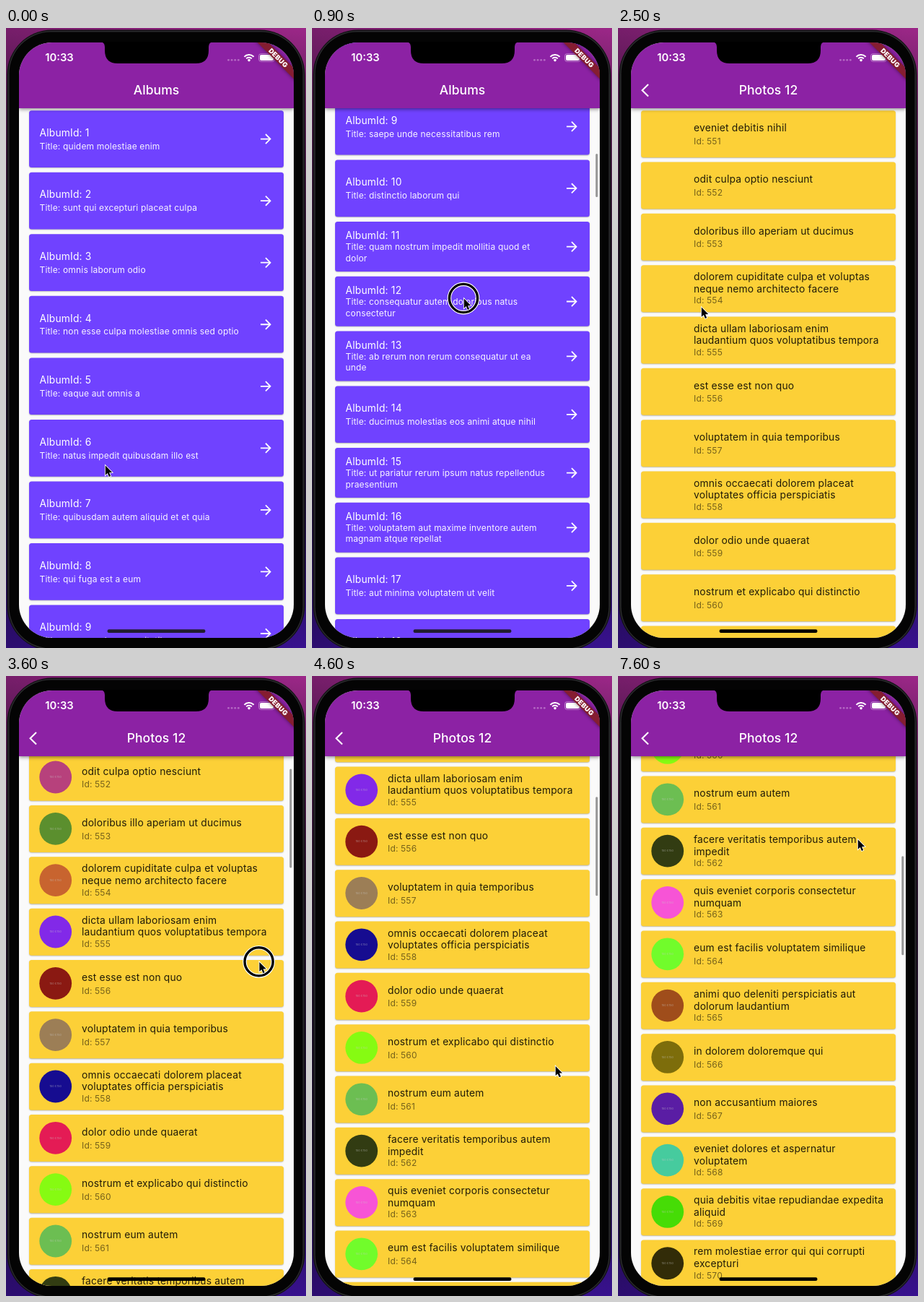
Animation, 416 px wide and 858 px high, one loop 7.7 s. Source, as an HTML page with a canvas:

```html
<!DOCTYPE html>
<html lang="en">
<head>
<meta charset="utf-8">
<title>Albums</title>
<style>
  html, body { margin: 0; width: 100%; height: 100%; overflow: hidden; background: #000; }
  canvas { display: block; width: 416px; height: 858px; }
</style>
</head>
<body>
<canvas id="stage"></canvas>
<script>
const W = 416, H = 858, LOOP = 7700, STEP = 100;
const SCREEN = { x: 18, y: 20, w: 381, h: 824, r: 46 };
const BAR_BOTTOM = 111;
const FONT = 'Inter, "Liberation Sans", sans-serif';

const canvas = document.getElementById('stage');
const dpr = window.devicePixelRatio || 1;
canvas.width = W * dpr;
canvas.height = H * dpr;
const ctx = canvas.getContext('2d');

// A bar marks a line break.
const albums = [
  'quidem molestiae enim', 'sunt qui excepturi placeat culpa', 'omnis laborum odio',
  'non esse culpa molestiae omnis sed optio', 'eaque aut omnis a',
  'natus impedit quibusdam illo est', 'quibusdam autem aliquid et et quia',
  'qui fuga est a eum', 'saepe unde necessitatibus rem', 'distinctio laborum qui',
  'quam nostrum impedit mollitia quod et|dolor',
  'consequatur autem doloribus natus|consectetur',
  'ab rerum non rerum consequatur ut ea|unde', 'ducimus molestias eos animi atque nihil',
  'ut pariatur rerum ipsum natus repellendus|praesentium',
  'voluptatem aut maxime inventore autem|magnam atque repellat',
  'aut minima voluptatem ut velit', 'nesciunt quia et doloremque'
].map(s => s.split('|'));

const photos = [
  ['eveniet debitis nihil', '#3f9ad0'],
  ['odit culpa optio nesciunt', '#b7417c'],
  ['doloribus illo aperiam ut ducimus', '#5b8f2e'],
  ['dolorem cupiditate culpa et voluptas|neque nemo architecto facere', '#c8642f'],
  ['dicta ullam laboriosam enim|laudantium quos voluptatibus tempora', '#8229e8'],
  ['est esse est non quo', '#8a1912'],
  ['voluptatem in quia temporibus', '#9c7e56'],
  ['omnis occaecati dolorem placeat|voluptates officia perspiciatis', '#160c90'],
  ['dolor odio unde quaerat', '#e41b55'],
  ['nostrum et explicabo qui distinctio', '#86fb12'],
  ['nostrum eum autem', '#6cbe52'],
  ['facere veritatis temporibus autem|impedit', '#323c12'],
  ['quis eveniet corporis consectetur|numquam', '#f754d6'],
  ['eum est facilis voluptatem similique', '#71fc2b'],
  ['animi quo deleniti perspiciatis aut|dolorum laudantium', '#9f4d1b'],
  ['in dolorem doloremque qui', '#7d6d0b'],
  ['non accusantium maiores', '#5a1da4'],
  ['eveniet dolores et aspernatur|voluptatem', '#46cb9e'],
  ['quia debitis vitae repudiandae expedita|aliquid', '#46dc06'],
  ['rem molestiae error qui qui corrupti|excepturi', '#322c08']
].map(([title, color]) => ({ lines: title.split('|'), color }));

// time, x, y
const pointerPath = [
  [0, 137, 604], [250, 137, 604], [450, 212, 640], [850, 210, 373], [1050, 210, 373],
  [1650, 115, 385], [2700, 115, 385], [3400, 350, 450], [4100, 353, 169],
  [4300, 353, 169], [4650, 336, 560], [5200, 332, 225]
];
const presses = [[450, 950], [1750, 1900], [3450, 4100], [4650, 5150]];

const clamp = v => Math.max(0, Math.min(1, v));
const span = (t, a, b) => clamp((t - a) / (b - a));
const smooth = v => v * v * (3 - 2 * v);
const easeOut = v => 1 - (1 - v) ** 2;

function bezier(x, x1, y1, x2, y2) {
  const at = (s, a, b) => 3 * s * (1 - s) ** 2 * a + 3 * s * s * (1 - s) * b + s ** 3;
  let lo = 0, hi = 1;
  for (let i = 0; i < 24; i++) {
    const mid = (lo + hi) / 2;
    if (at(mid, x1, x2) < x) lo = mid; else hi = mid;
  }
  return at(lo, y1, y2);
}

function pointerAt(t) {
  const i = pointerPath.findIndex(k => k[0] > t);
  if (i < 0) return pointerPath[pointerPath.length - 1].slice(1);
  const [t0, x0, y0] = pointerPath[i - 1], [t1, x1, y1] = pointerPath[i];
  const k = smooth(span(t, t0, t1));
  return [x0 + (x1 - x0) * k, y0 + (y1 - y0) * k];
}

function box(x, y, w, h, r, fill) {
  ctx.beginPath();
  ctx.roundRect(x, y, w, h, r);
  ctx.fillStyle = fill;
  ctx.fill();
}

function dot(x, y, r, fill) {
  ctx.beginPath();
  ctx.arc(x, y, r, 0, Math.PI * 2);
  ctx.fillStyle = fill;
  ctx.fill();
}

function line(points, color, width) {
  ctx.beginPath();
  points.forEach(([x, y]) => ctx.lineTo(x, y));
  ctx.strokeStyle = color;
  ctx.lineWidth = width;
  ctx.stroke();
}

function text(str, x, y, size, color, weight = 400, spacing = 0, align = 'left') {
  ctx.font = `${weight} ${size}px ${FONT}`;
  ctx.letterSpacing = spacing + 'px';
  ctx.textAlign = align;
  ctx.fillStyle = color;
  ctx.fillText(str, x, y);
}

const heading = (s, x, y, color) => text(s, x, y, 13.8, color, 400, 0.2);
const caption = (s, x, y, color) => text(s, x, y, 12, color, 400, 0.17);

function card(y, h, fill) {
  ctx.save();
  ctx.shadowColor = 'rgba(0,0,0,.28)';
  ctx.shadowBlur = 1.5 * dpr;
  ctx.shadowOffsetY = 0.8 * dpr;
  box(32, y, 353, h, 3.5, fill);
  ctx.restore();
}

function appBar(title, back) {
  ctx.save();
  ctx.shadowColor = 'rgba(0,0,0,.45)';
  ctx.shadowBlur = 5 * dpr;
  ctx.shadowOffsetY = 1.5 * dpr;
  box(18, 20, 381, BAR_BOTTOM - 20, 0, '#8c22a4');
  ctx.restore();
  text(title, 208.5, 92.2, 17.5, '#fff', 500, 0.1, 'center');
  if (back) line([[42, 78], [33.6, 86.2], [42, 94.4]], '#fff', 2.1);
}

function scrollbar(y, h, alpha) {
  if (alpha > 0) box(393.3, y, 3, h, 1.5, `rgba(90,90,90,${0.62 * alpha})`);
}

function albumCard(lines, id, y, ripple) {
  const two = lines.length > 1, h = two ? 69 : 78.7;
  card(y, h, '#7042ff');
  if (ripple > 0 && id === 12) {
    ctx.save();
    ctx.beginPath();
    ctx.roundRect(32, y, 353, h, 3.5);
    ctx.clip();
    dot(115, 385, ripple, 'rgba(255,255,255,.15)');
    ctx.restore();
  }
  heading('AlbumId: ' + id, 46.5, y + (two ? 24.2 : 35.7), '#fff');
  lines.forEach((s, i) =>
    caption((i ? '' : 'Title: ') + s, 46.5, y + (two ? 39.4 + i * 15.3 : 53.6), '#f8f4ff'));
  const m = y + (two ? 34.7 : 39.4);
  line([[353, m], [366, m]], '#fff', 1.8);
  line([[360, m - 6.6], [366.5, m], [360, m + 6.6]], '#fff', 1.8);
}

function albumPage(t) {
  const scroll = 701.7 * easeOut(span(t, 350, 850));
  const ripple = t < 1850 ? 0 : 77 * span(t, 1850, 2100);
  box(18, 20, 381, 824, 0, '#fafafa');
  let y = 114.2 - scroll;
  albums.forEach((lines, i) => {
    if (y > 10 && y < H) albumCard(lines, i + 1, y, ripple);
    y += lines.length > 1 ? 75.8 : 85.55;
  });
  scrollbar(113 + scroll * 0.087, 60, span(t, 350, 450) * (1 - span(t, 1400, 1700)));
  appBar('Albums');
}

function photoCard({ lines, color }, id, y, loaded) {
  const two = lines.length > 1;
  card(y, 65, '#fcd037');
  if (loaded) {
    dot(68.7, y + 32.3, 22.4, color);
    text('150 x 150', 68.7, y + 33.6, 3.8, 'rgba(200,200,200,.6)', 400, 0, 'center');
  }
  lines.forEach((s, i) =>
    heading(s, 105, y + (two ? 21 + i * 16.8 : 28.8), 'rgba(0,0,0,.87)'));
  caption('Id: ' + id, 105, y + (two ? 53.3 : 46.6), 'rgba(0,0,0,.54)');
}

function loader(t) {
  ctx.save();
  ctx.translate(215, 463);
  ctx.rotate(0.4 + (t - 2100) / 400);
  box(-4, -2, 4.5, 4, 1, '#2b9a98');
  box(0, -2, 4, 4, 1, '#3a62a8');
  ctx.restore();
}

function photoPage(t) {
  const scroll = 274 * easeOut(span(t, 3500, 4150)) + 415 * easeOut(span(t, 4650, 5250));
  box(18, 20, 381, 824, 0, '#fafafa');
  if (t < 2400) {
    loader(t);
  } else {
    photos.forEach((p, i) => {
      const y = 114.2 + i * 71.33 - scroll;
      if (y > 30 && y < H) photoCard(p, 551 + i, y, t >= 2800);
    });
    scrollbar(113 + scroll * 0.1976, 137, span(t, 3500, 3600));
  }
  appBar('Photos 12', true);
}

function statusBar() {
  text('10:33', 74, 46.2, 14.8, '#fff', 600, 0, 'center');
  for (let i = 0; i < 4; i++) dot(308.5 + i * 4.6, 44.3, 1.4, '#b569c4');

  ctx.strokeStyle = '#fff';
  ctx.lineWidth = 2;
  for (const r of [5.2, 9]) {
    ctx.beginPath();
    ctx.arc(337, 46, r, -Math.PI * 0.76, -Math.PI * 0.24);
    ctx.stroke();
  }
  dot(337, 44.6, 1.8, '#fff');

  ctx.beginPath();
  ctx.roundRect(350.5, 35.6, 22, 10.8, 3.2);
  ctx.strokeStyle = 'rgba(255,255,255,.4)';
  ctx.lineWidth = 1;
  ctx.stroke();
  box(352, 37.1, 19, 7.8, 2, '#fff');
}

function debugBanner() {
  ctx.save();
  ctx.translate(399, 20);
  ctx.rotate(Math.PI / 4);
  ctx.shadowColor = 'rgba(0,0,0,.5)';
  ctx.shadowBlur = 5 * dpr;
  box(-50, 24.9, 100, 10.7, 0, '#851d31');
  ctx.shadowColor = 'transparent';
  text('DEBUG', 0, 33.6, 9.2, '#fff', 900, 0.3, 'center');
  ctx.restore();
}

function notch() {
  ctx.beginPath();
  ctx.moveTo(131, 19);
  ctx.quadraticCurveTo(137, 20, 137, 26);
  ctx.lineTo(137, 31);
  ctx.quadraticCurveTo(137, 49, 155, 49);
  ctx.lineTo(263, 49);
  ctx.quadraticCurveTo(281, 49, 281, 31);
  ctx.lineTo(281, 26);
  ctx.quadraticCurveTo(281, 20, 287, 19);
  ctx.fillStyle = '#000';
  ctx.fill();
}

function phone() {
  const g = ctx.createLinearGradient(0, 0, 0, H);
  g.addColorStop(0, '#9c2788');
  g.addColorStop(0.12, '#62205a');
  g.addColorStop(0.35, '#2c1430');
  g.addColorStop(0.75, '#1c1030');
  g.addColorStop(1, '#38118f');
  ctx.fillStyle = g;
  ctx.fillRect(0, 0, W, H);
  // The backdrop is dimmer towards the left.
  const dim = ctx.createLinearGradient(0, 0, W, 0);
  dim.addColorStop(0, 'rgba(10,0,20,.25)');
  dim.addColorStop(1, 'rgba(10,0,20,0)');
  ctx.fillStyle = dim;
  ctx.fillRect(0, 0, W, H);
  box(1.5, 2.5, 413, 859, 62, '#111113');
  box(3, 4, 410, 856, 60, '#2b2b2e');
  box(4.5, 5.5, 407, 853, 58, '#040404');
}

function pointer(t) {
  const [x, y] = pointerAt(t);
  ctx.save();
  ctx.translate(x, y);
  if (presses.some(([a, b]) => t >= a && t < b)) {
    for (const [color, width] of [['#fff', 5.6], ['#000', 3.4]]) {
      ctx.beginPath();
      ctx.arc(0, 1, 19.6, 0, Math.PI * 2);
      ctx.strokeStyle = color;
      ctx.lineWidth = width;
      ctx.stroke();
    }
  }
  ctx.translate(0.8, 1.6);
  ctx.scale(0.85, 0.85);
  ctx.beginPath();
  [[0, 0], [0, 15.5], [3.5, 12.3], [6, 18], [8.6, 16.9], [6.2, 11.3], [11, 11.1]]
    .forEach(p => ctx.lineTo(...p));
  ctx.closePath();
  ctx.strokeStyle = '#fff';
  ctx.lineWidth = 2;
  ctx.stroke();
  ctx.fillStyle = '#000';
  ctx.fill();
  ctx.restore();
}

function draw(t) {
  ctx.setTransform(dpr, 0, 0, dpr, 0, 0);
  phone();
  ctx.save();
  ctx.beginPath();
  ctx.roundRect(SCREEN.x, SCREEN.y, SCREEN.w, SCREEN.h, SCREEN.r);
  ctx.clip();

  const push = bezier(span(t, 1989, 2389), 0.35, 0.91, 0.33, 0.97);
  const shift = SCREEN.w * (1 - push);
  if (push < 0.999) {
    ctx.save();
    ctx.translate(-SCREEN.w / 3 * push, 0);
    albumPage(t);
    ctx.restore();
  }
  if (push > 0.001) {
    ctx.save();
    ctx.translate(shift, 0);
    const g = ctx.createLinearGradient(12, 0, 18, 0);
    g.addColorStop(0, 'rgba(0,0,0,0)');
    g.addColorStop(1, 'rgba(0,0,0,.1)');
    ctx.fillStyle = g;
    ctx.fillRect(12, 20, 6, 824);
    ctx.beginPath();
    ctx.rect(18, 20, 381, 824);
    ctx.clip();
    photoPage(t);
    ctx.restore();
  }
  statusBar();
  debugBanner();
  box(140.5, 832.3, 136, 4.8, 2.4, push > 0.2 ? '#000' : '#211d30');
  ctx.restore();
  notch();
  pointer(t);
}

const start = performance.now();
function tick(now) {
  const t = Math.max(0, now - start) % LOOP;
  draw(Math.floor(t / STEP) * STEP);
  requestAnimationFrame(tick);
}
tick(start);
</script>
</body>
</html>
```
